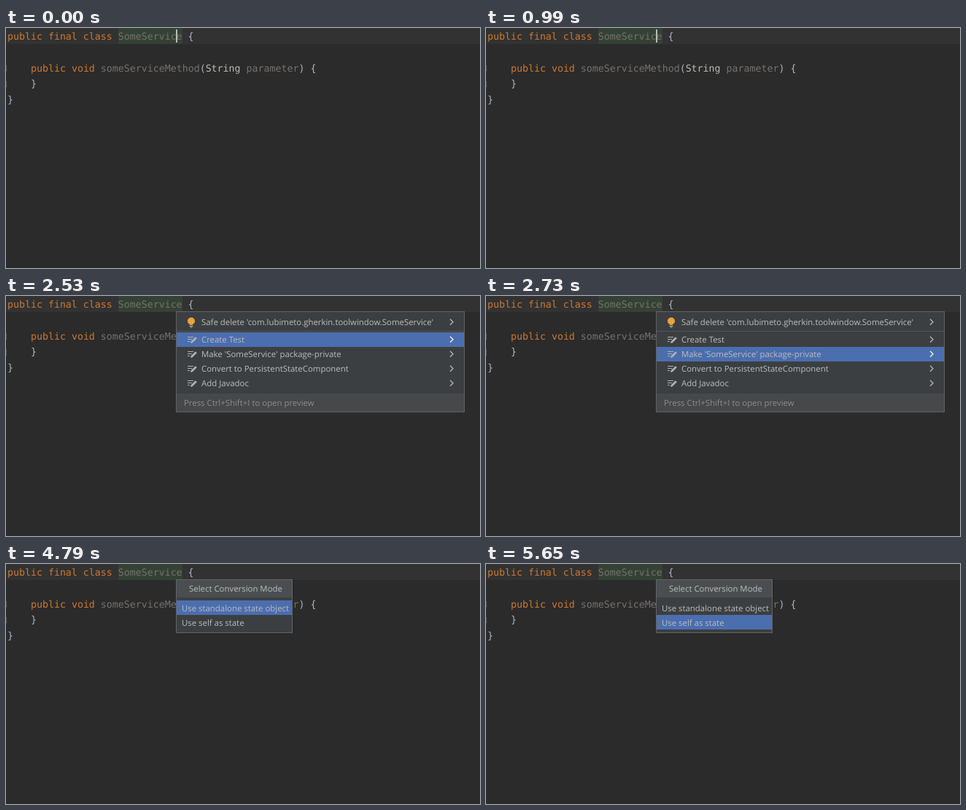
An HTML page for the animation above (8000 ms loop, 650x330 px).

```html
<!DOCTYPE html>
<html lang="en">
<head>
<meta charset="utf-8">
<title>Convert a service class</title>
<style>
  html, body { margin: 0; width: 100%; height: 100%; overflow: hidden; background: #2b2b2b; }
  svg { display: block; }
  text { white-space: pre; text-rendering: geometricPrecision; }
  .code { font: 13.288px "DejaVu Sans Mono", "Noto Sans Mono", monospace; fill: #a9b7c6; }
  .key { fill: #cc7832; }
  .unused { fill: #75716e; }
  .type { fill: #b9b9b3; }
  .menu { font: 11.4px "Open Sans", "Noto Sans", sans-serif; fill: #bbb; }
  .panel { fill: #3c3f41; stroke: #616466; }
  .pick { fill: #4b6eaf; }
  .hint { fill: #8c8c8c; }
  .line { fill: none; stroke: #afb1b3; stroke-width: 1.4; }
</style>
</head>
<body>
<svg width="650" height="330" viewBox="0 0 650 330">
  <rect width="650" height="330" fill="#2b2b2b"/>
  <rect width="650" height="22" fill="#323232"/>
  <rect x="154" width="88" height="22" fill="#344134"/>
  <path d="M0 51.5h.5v8h-.5M0 73.5h.5v8h-.5" fill="none" stroke="#555"/>
  <g class="code">
    <text x="2" y="16"><tspan class="key">public final class </tspan><tspan class="unused">SomeService</tspan> {</text>
    <text x="34" y="60"><tspan class="key">public void </tspan><tspan class="unused">someServiceMethod</tspan>(<tspan class="type">String </tspan><tspan class="unused">parameter</tspan>) {</text>
    <text x="34" y="81">}</text>
    <text x="2" y="103">}</text>
  </g>
  <rect id="caret" x="233" y="2" width="2" height="18" fill="#bbb"/>

  <g id="actions" class="menu">
    <rect class="panel" x="233.5" y="21.5" width="395" height="138"/>
    <rect x="234" y="134" width="394" height="25" fill="#46484a"/>
    <path d="M234 48.5h394" stroke="#515355"/>
    <rect class="pick" x="234" width="394" height="20"/>
    <g id="rows"></g>
    <circle cx="254" cy="34.5" r="5" fill="#eba33b"/>
    <path d="M252 38h4v2h-4z" fill="#eba33b"/>
    <path d="M251.5 41.5h5M252.5 43h3" stroke="#afb1b3"/>
    <text class="hint" x="244" y="151">Press Ctrl+Shift+I to open preview</text>
  </g>

  <g id="modes" class="menu">
    <rect class="panel" x="233.5" y="21.5" width="159" height="73"/>
    <rect x="234" y="22" width="158" height="24" fill="#4b4e50"/>
    <text x="315" y="38" text-anchor="middle">Select Conversion Mode</text>
    <rect class="pick" x="234" width="158" height="20"/>
    <text x="241" y="65">Use standalone state object</text>
    <text x="241" y="85">Use self as state</text>
  </g>
</svg>
<script>
const LOOP = 8000;
const $ = id => document.getElementById(id);
const labels = [
  "Safe delete 'com.lubimeto.gherkin.toolwindow.SomeService'",
  "Create Test",
  "Make 'SomeService' package-private",
  "Convert to PersistentStateComponent",
  "Add Javadoc"
];
const rowTop = i => i ? 30 + 20 * i : 26;

// The first row carries the bulb, all others a pencil over text lines.
const pencil = `<path class="line" style="stroke-width:1" d="M-12 -3.5h8M-12 -.5h6M-12 2.5h3"/>
  <path d="M-8 5l.8-2.8 6-6 2 2-6 6z" fill="#afb1b3"/>`;
$("rows").innerHTML = labels.map((label, i) => `
  <g transform="translate(0 ${rowTop(i) + 10})">
    ${i ? `<g transform="translate(261)">${pencil}</g>` : ""}
    <text x="268" y="4">${label}</text>
    <path class="line" d="M609 -4.3l4 4-4 4"/>
  </g>`).join("");
const arrows = document.querySelectorAll("#rows > g > .line");

const show = (id, on) => $(id).style.display = on ? "" : "none";
const pick = (id, y) => $(id).querySelector(".pick").setAttribute("y", y);

function draw() {
  const t = performance.now() % LOOP;
  show("caret", t < 530 || t >= 990 && t < 1520);
  show("actions", t >= 1520 && t < 4790);
  show("modes", t >= 4790);

  const row = t < 2530 ? 0 : t < 2730 ? 1 : t < 3000 ? 2 : 3;
  pick("actions", rowTop(row));
  arrows.forEach((arrow, i) => arrow.style.stroke = i === row ? "#eee" : "");
  pick("modes", t < 5650 ? 50 : 70);
  requestAnimationFrame(draw);
}
draw();
</script>
</body>
</html>
```
